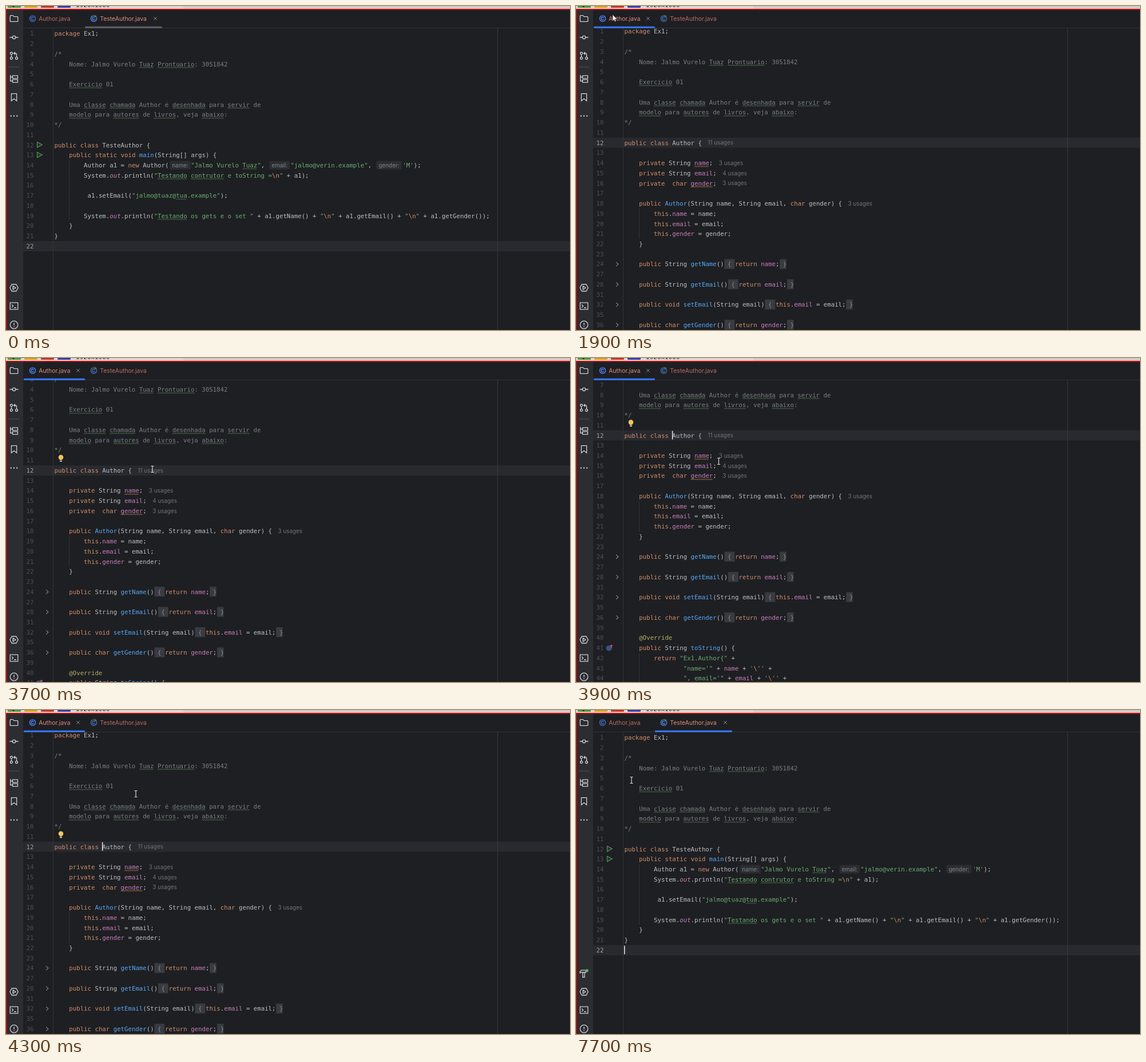
Write an HTML page with a canvas that moves like this. It is 986x568 px and loops after 8000 ms.

```html
<!DOCTYPE html>
<html lang="pt">
<head>
<meta charset="utf-8">
<style>
html, body { margin: 0; width: 100%; height: 100%; overflow: hidden; background: #1e1f22; }
canvas { display: block; }
</style>
</head>
<body>
<canvas id="stage" width="986" height="568"></canvas>
<script>
const ctx = document.getElementById('stage').getContext('2d');
const W = 986, H = 568, LOOP = 8000;
const TEXT_X = 84.5, TOP = 39.6, ROW = 17.74, COL = 6.45, VIEW_TOP = 39;
const MONO = '10.71px "DejaVu Sans Mono", monospace';
const HINT = '9.9px Inter, sans-serif';
const UI = '10.4px Inter, sans-serif';

const COLORS = {
  text: '#bcbec4', key: '#cf8e6d', str: '#6aab73', field: '#c77dbb', stat: '#c77dbb',
  method: '#56a8f5', note: '#b3ae60', comment: '#7a7e85', fold: '#868a91'
};

const HEADER = `package Ex1;

/*
    Nome: Jalmo Vurelo Tuaz Prontuario: 3051842

    Exercicio 01

    Uma classe chamada Author é desenhada para servir de
    modelo para autores de livros, veja abaixo:
*/

`;

// «» marks an inlay hint, ‹› a folded part.
const AUTHOR = HEADER + String.raw`public class Author {«11 usages»

    private String name;«3 usages»
    private String email;«4 usages»
    private  char gender;«3 usages»

    public Author(String name, String email, char gender) {«3 usages»
        this.name = name;
        this.email = email;
        this.gender = gender;
    }

    public String getName()‹ { ›return name;‹ }›

    public String getEmail()‹ { ›return email;‹ }›

    public void setEmail(String email)‹ { ›this.email = email;‹ }›

    public char getGender()‹ { ›return gender;‹ }›

    @Override
    public String toString() {
        return "Ex1.Author{" +
                "name='" + name + '\'' +
                ", email='" + email + '\'' +
                ", gender=" + gender +
                '}';
    }
}`;

const TESTE = HEADER + String.raw`public class TesteAuthor {
    public static void main(String[] args) {
        Author a1 = new Author(«name:»"Jalmo Vurelo Tuaz", «email:»"jalmo@verin.example", «gender:»'M');
        System.out.println("Testando contrutor e toString =\n" + a1);

         a1.setEmail("jalmo@tuaz@tua.example");

        System.out.println("Testando os gets e o set " + a1.getName() + "\n" + a1.getEmail() + "\n" + a1.getGender());
    }
}
`;

const TOKEN = new RegExp([
  /(?<hint>«[^»]*»)/, /(?<fold>‹[^›]*›)/,
  /(?<str>"(?:\\.|[^"\\])*"|'(?:\\.|[^'\\])*')/,
  /(?<key>\b(?:package|public|private|class|static|void|new|char|return|this)\b)/,
  /(?<field>(?<=this\.|private String |private  char |return |" \+ )(?:name|email|gender)\b)/,
  /(?<method>(?<=public (?:static )?(?:void |String |char )?)\b\w+(?=\())/,
  /(?<note>@\w+)/, /(?<stat>\bout\b)/, /(?<text>\s+|\w+|.)/
].map(r => r.source).join('|'), 'g');

const TYPO = /^(?:Tuaz|Prontuario|Exercicio|classe|chamada|desenhada|servir|modelo|autores|livros|abaixo|Testando|contrutor|tua)$/;

function tokenize(line, isComment) {
  if (isComment) return [{ kind: 'comment', s: line }];
  const tokens = [];
  for (const m of line.matchAll(TOKEN)) {
    const kind = Object.keys(m.groups).find(k => m.groups[k] !== undefined);
    if (kind === 'str') {
      for (const s of m[0].split(/(\\.)/)) tokens.push({ kind: s[0] === '\\' ? 'key' : 'str', s });
    } else {
      tokens.push({ kind, s: kind === 'hint' || kind === 'fold' ? m[0].slice(1, -1) : m[0] });
    }
  }
  return tokens;
}

function parse(source) {
  const lines = source.split('\n');
  let number = 0;
  return lines.map((line, i) => {
    number += i && lines[i - 1].includes('‹') ? 3 : 1;
    const deep = s => /^ {8}/.test(s || '');
    return {
      number,
      tokens: tokenize(line, i > 1 && i < 10),
      folded: line.includes('‹'),
      runnable: /class Teste|main\(/.test(line),
      overrides: /toString\(\) \{/.test(line),
      guide: deep(line) || (!line && deep(lines[i + 1])),
      warns: /^ +private .*(name|gender);/.test(line)
    };
  });
}

const FILES = {
  author: { rows: parse(AUTHOR), current: 11, caretCol: 13 },
  teste: { rows: parse(TESTE), current: 21, caretCol: 0 }
};
const TABS = [
  { id: 'author', label: 'Author.java', x: 31, w: 107 },
  { id: 'teste', label: 'TesteAuthor.java', x: 138, w: 135 }
];

const MOUSE = [
  [1100, -20, -30], [1200, 3, 0], [1700, 64, 14], [1900, 64, 15], [2700, 64, 15], [2800, 63, 14],
  [2900, 63, 14], [3100, 145, 16], [3200, 145, 16], [3500, 225, 24], [3600, 225, 24],
  [3700, 256, 195], [4100, 243, 167], [4300, 227, 147], [4400, 227, 147], [4800, 205, 90],
  [4900, 205, 90], [5200, 158, 19], [5300, 158, 20], [5600, 158, 20], [6000, 13, 0],
  [6100, 13, 0], [6200, 109, 45], [6600, 109, 45], [7000, 97, 123]
];
const SCROLL = [
  [3600, 3.9], [3700, 46.6], [3800, 88], [3900, 108], [4000, 100], [4100, 70.2],
  [4200, 20], [4300, 3.9], [4400, 3.9], [4800, 0]
];
const CARET_ON = [[2000, 2400], [3000, 3400], [3900, 4500], [5200, 5900], [6400, 6900], [7300, 8000]];

function along(keys, t) {
  const i = keys.findIndex(k => k[0] > t);
  if (i === 0) return keys[0].slice(1);
  if (i < 0) return keys[keys.length - 1].slice(1);
  const [a, b] = [keys[i - 1], keys[i]], p = (t - a[0]) / (b[0] - a[0]);
  return a.slice(1).map((v, j) => v + (b[j + 1] - v) * p);
}

function rect(x, y, w, h, color, r = 0) {
  ctx.fillStyle = color;
  ctx.beginPath();
  ctx.roundRect(x, y, w, h, r);
  ctx.fill();
}

function text(s, x, y, color, font = MONO, align = 'left') {
  ctx.font = font;
  ctx.fillStyle = color;
  ctx.textAlign = align;
  ctx.fillText(s, x, y);
}

function shape(x, y, d, stroke, fill, width = 1.3) {
  const path = new Path2D(d);
  ctx.save();
  ctx.translate(x, y);
  ctx.lineWidth = width;
  if (fill) { ctx.fillStyle = fill; ctx.fill(path); }
  if (stroke) { ctx.strokeStyle = stroke; ctx.stroke(path); }
  ctx.restore();
}

const circle = (x, y, r) => `M${x - r} ${y}a${r} ${r} 0 1 0 ${2 * r} 0a${r} ${r} 0 1 0 ${-2 * r} 0z`;

function squiggle(x, y, w, color) {
  ctx.beginPath();
  ctx.moveTo(x, y + 1);
  for (let i = 1; i * 1.65 <= w; i++) ctx.lineTo(x + i * 1.65, y + (i % 2 ? -0.6 : 1));
  ctx.strokeStyle = color;
  ctx.lineWidth = 0.9;
  ctx.stroke();
}

function drawHint(s, x, mid) {
  ctx.font = HINT;
  if (!s.endsWith(':')) {
    text(s, x + 10.5, mid + 3.7, '#6f737a', HINT);
    return 0;
  }
  const w = ctx.measureText(s).width;
  rect(x + 1.8, mid - 7.5, w + 8, 15, '#2b2d31', 3);
  text(s, x + 5.8, mid + 3.5, '#80848b', HINT);
  return s === 'gender:' ? 7.4 * COL : 6 * COL;
}

function drawRow(row, y, isCurrent) {
  const mid = y + ROW / 2, base = mid + 3.9;
  text(row.number, 48.5, base, isCurrent ? '#a1a3ab' : '#4b5059', MONO, 'right');
  if (row.folded) shape(72, mid, 'M-1.8-3.5L1.8 0L-1.8 3.5', '#868a91', null, 1.1);
  if (row.runnable) shape(58.5, mid - 0.3, 'M-4-4.7L4.8 0L-4 4.7z', '#57965c', '#253627', 1.1);
  if (row.overrides) {
    shape(57.5, mid + 0.5, circle(0, 0, 4), '#548af7', '#25324d', 1);
    shape(57.5, mid + 0.5, circle(0, 0, 1.6), '#548af7', null, 1);
    shape(62, mid - 3, 'M0 4V-2M-2 0L0-2L2 0', '#db5c5c', null, 1.1);
  }
  if (row.guide) rect(110, y, 1, ROW, '#313438');

  let x = TEXT_X;
  for (const { kind, s } of row.tokens) {
    if (kind === 'hint') { x += drawHint(s, x, mid); continue; }
    const w = s.length * COL;
    if (kind === 'fold') rect(x + 0.8, y, w - 1.5, ROW - 0.5, '#393b40');
    text(s, x, base, COLORS[kind], kind === 'stat' ? 'italic ' + MONO : MONO);
    if (kind === 'str' || kind === 'comment') {
      for (const m of s.matchAll(/\w+/g)) {
        if (TYPO.test(m[0])) squiggle(x + m.index * COL, mid + 6, m[0].length * COL, '#56805a');
      }
    }
    if (row.warns && kind === 'field') squiggle(x, mid + 6, w, '#b98a4b');
    x += w;
  }
}

function drawEditor(file, scroll, caretOn, bulbOn) {
  const rowY = i => TOP + i * ROW - scroll;
  const y = rowY(file.current);
  ctx.save();
  ctx.beginPath();
  ctx.rect(30, VIEW_TOP, W - 30, H);
  ctx.clip();
  rect(30, y, W, ROW, '#292a2f');
  rect(82, VIEW_TOP, 1, H, '#313438');
  rect(859, VIEW_TOP, 1, H, '#393b40');
  file.rows.forEach((row, i) => {
    if (rowY(i) > VIEW_TOP - ROW && rowY(i) < H) drawRow(row, rowY(i), i === file.current);
  });
  if (bulbOn) {
    const by = y - 12.5;
    shape(96, by, 'M-2 3.2C-2 1.8-4.3 1.2-4.3-1.6A4.3 4.3 0 0 1 4.3-1.6C4.3 1.2 2 1.8 2 3.2z', null, '#f2c55c');
    rect(94, by + 4, 4, 2, '#ced0d6', 0.7);
  }
  if (caretOn) rect(TEXT_X + file.caretCol * COL - 0.5, y + 1, 1.6, 15, '#dfe1e5');
  ctx.restore();
}

function drawTab(tab, active, focused, mouse) {
  const hovered = mouse[0] >= tab.x && mouse[0] < tab.x + tab.w && mouse[1] > 7 && mouse[1] < VIEW_TOP;
  const ix = tab.x + 15.5;
  ctx.globalAlpha = active ? 1 : 0.75;
  shape(ix, 22, circle(0, 0, 5.3), '#548af7', '#25324d', 1.1);
  shape(ix, 22, 'M2-1.6A2.6 2.6 0 1 0 2 1.6', '#548af7', null, 1.2);
  if (tab.id === 'teste') shape(ix + 2, 18, 'M-1.3-3L4.2 0L-1.3 3z', '#1e1f22', '#57965c', 0.8);
  ctx.globalAlpha = 1;
  text(tab.label, tab.x + 26.3, 26.3, active ? '#e08a7a' : '#bb6a5e', UI);
  if (active || hovered) shape(tab.x + tab.w - 12, 22, 'M-2.8-2.8L2.8 2.8M2.8-2.8L-2.8 2.8', '#868a91', null, 1);
  if (active) rect(tab.x, 35.7, tab.w, 3.3, focused ? '#3574f0' : '#5a5d63', 1.2);
}

const ICONS = [
  [22, 'M-6.8-4.2a1.2 1.2 0 0 1 1.2-1.2h3.6l2 2h5.6a1.2 1.2 0 0 1 1.2 1.2v6.4a1.2 1.2 0 0 1-1.2 1.2h-11.2a1.2 1.2 0 0 1-1.2-1.2z'],
  [55, circle(0, 0, 2.7) + 'M-7.5 0H-2.7M2.7 0H7.5'],
  [87, circle(-4.5, -4, 2) + circle(-4.5, 4.5, 2) + circle(4.5, 4.5, 2) + 'M-4.5-2V2.5M4.5 2.5V-2a2 2 0 0 0-2-2H0M2-6.3L-.3-4L2-1.7'],
  [128, 'M-2.5-5.8H6.5V-1.2H-2.5zM-2.5 1.2H6.5V5.8H-2.5zM-6.3-7V3.5H-2.5M-6.3-3.5H-2.5'],
  [160, 'M-4.6-6.3H4.6V6.3L0 2.6L-4.6 6.3z'],
  [494, 'M-3.8-6H3.8L7.2 0L3.8 6H-3.8L-7.2 0zM-1.8-3L3 0L-1.8 3z'],
  [526, 'M-6.8-5.8H6.8V5.8H-6.8zM-4-2.6L-1.4 0L-4 2.6M0 3H4'],
  [559, circle(0, 0, 6.8) + 'M0-3.8V1M0 2.6V4']
];

function drawSidebar(hammerOn) {
  const ink = '#ced0d6';
  rect(0, 7, 30, H, '#2b2d30');
  for (const [y, d] of ICONS) shape(14, y, d, ink);
  for (let i = -1; i <= 1; i++) shape(14, 192.7, circle(i * 5.2, 0, 1.2), null, ink);
  rect(4, 106.5, 19, 1, '#4e5157');
  if (hammerOn) {
    shape(13.5, 462, 'M-6.5-3.5L-4-5.8H3.5V-2H-4L-6.5-1zM-1.7-2V6.5H1.5V-2', ink);
    shape(19, 457, circle(0, 0, 2.8), null, '#57b36a');
  }
}

function drawFrame() {
  rect(0, 0, W, 6, '#cfcdca');
  rect(0, 0, 310, 5, '#d8d7d5');
  ['#4f9a35', '#d3a51c', '#bd3a2c', '#3340ae'].forEach((c, i) => rect(3 + i * 29, -4, 23, 7, c, 1.5));
  shape(10, 0, 'M0-4L5 2L2 2z', null, '#2a2420');
  text('1920x1080', 122, 2, '#333', '10.5px "DejaVu Sans", sans-serif');
  rect(0, 5, W, 2, '#c40808');
  rect(0, 5, 1.5, H, '#c40808');
}

function drawMouse([x, y]) {
  if (y > VIEW_TOP) {
    shape(x, y, 'M-2.5-5.5H-.7L0-5L.7-5.5H2.5M0-5V5M-2.5 5.5H-.7L0 5L.7 5.5H2.5', '#e6e6e6', null, 1.1);
  } else {
    shape(x, y, 'M0 0V11.2L2.6 8.8L4.3 12.6L6.1 11.8L4.4 8.1H8z', '#222', '#fff', 0.7);
  }
}

function draw(now) {
  const t = Math.floor((now % LOOP) / 100) * 100;
  const activeId = t >= 1800 && t < 5200 ? 'author' : 'teste';
  const mouse = along(MOUSE, t);
  const caretOn = CARET_ON.some(([from, to]) => t >= from && t < to);
  const inAuthor = activeId === 'author';

  rect(0, 0, W, H, '#1e1f22');
  rect(30, 38, W, 1, '#313338');
  drawEditor(FILES[activeId], inAuthor ? along(SCROLL, t)[0] : 0, caretOn, inAuthor && t >= 2700);
  for (const tab of TABS) drawTab(tab, tab.id === activeId, t >= 1800, mouse);
  drawSidebar(t >= 7700);
  drawFrame();
  drawMouse(mouse);
  requestAnimationFrame(draw);
}
requestAnimationFrame(draw);
</script>
</body>
</html>
```
